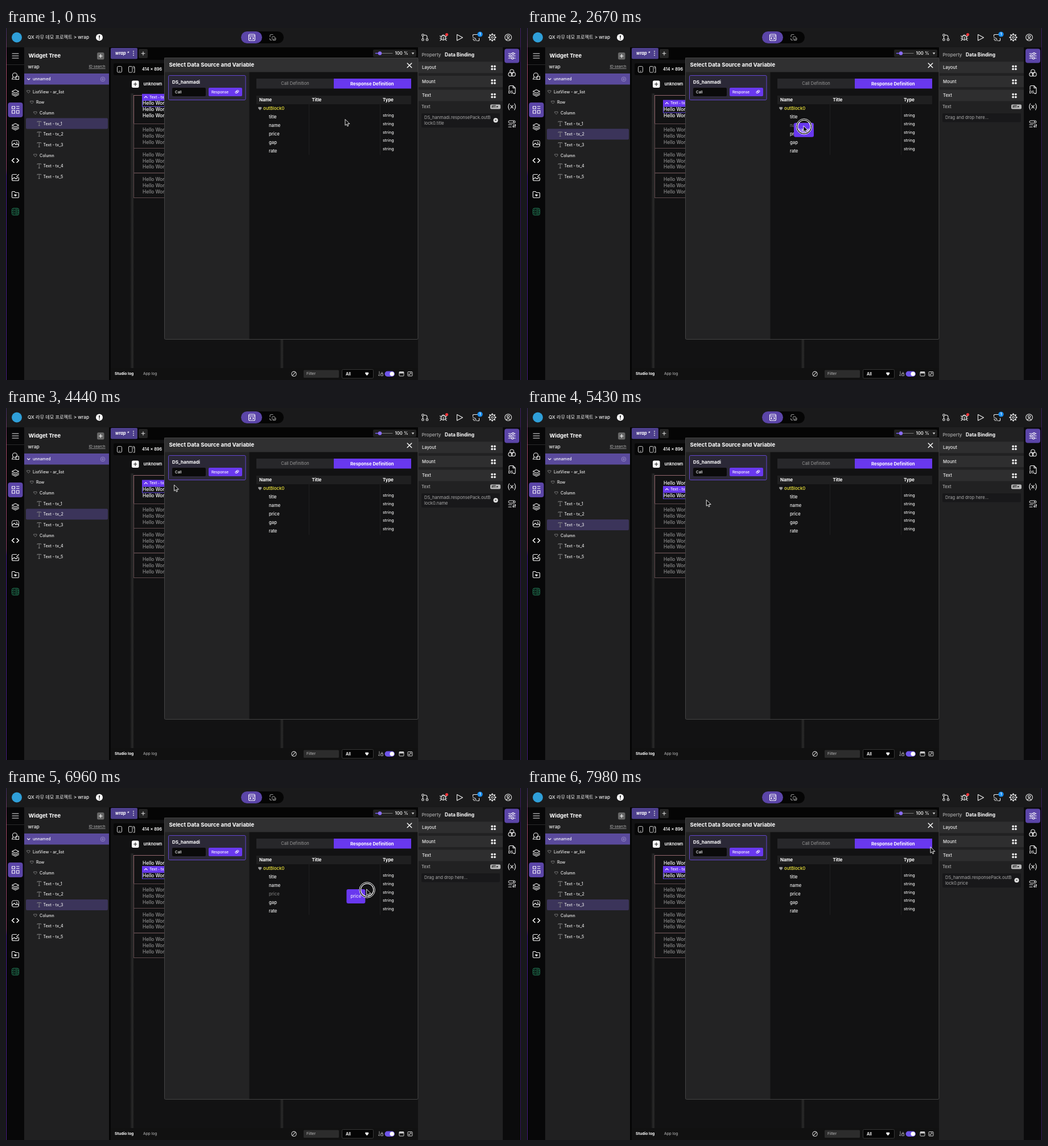
An HTML page that plays this animation: 905 px wide and 619 px high, repeating every 8 s.

```html
<!DOCTYPE html>
<html lang="ko">
<head>
<meta charset="utf-8">
<title>Data binding</title>
<style>
html, body { margin: 0; width: 100%; height: 100%; overflow: hidden; background: #000; }
svg { display: block; width: 905px; height: 619px; font-family: Inter, "Noto Sans CJK KR", "Noto Sans CJK", sans-serif; }
text { white-space: pre; }
</style>
</head>
<body>
<svg id="stage" viewBox="0 0 905 619" xmlns="http://www.w3.org/2000/svg"></svg>
<script>
const LOOP = 8000, VIOLET = '#6938ef', PINK = '#f52fd0';

const rect = (x, y, w, h, fill, more = '') =>
  `<rect x="${x}" y="${y}" width="${w}" height="${h}" fill="${fill}" ${more}/>`;
const box = (x, y, w, h, stroke, fill = 'none', rx = 0) =>
  rect(x, y, w, h, fill, `stroke="${stroke}" rx="${rx}"`);
// y is the middle of the line
const text = (x, y, s, size, fill = '#fff', weight = 500, more = '') =>
  `<text x="${x}" y="${(y + size * .36).toFixed(2)}" font-size="${size}" fill="${fill}" font-weight="${weight}" ${more}>${s}</text>`;
const path = (d, stroke = '#eee', width = 1.1, fill = 'none') =>
  `<path d="${d}" stroke="${stroke}" stroke-width="${width}" fill="${fill}" stroke-linecap="round" stroke-linejoin="round"/>`;
const dot = (x, y, r, fill, stroke = 'none', width = 1) =>
  `<circle cx="${x}" cy="${y}" r="${r}" fill="${fill}" stroke="${stroke}" stroke-width="${width}"/>`;
const ring = (x, y, r, stroke = '#eee', width = 1.1) => dot(x, y, r, 'none', stroke, width);
const at = (x, y, s) => `<g transform="translate(${x} ${y})">${s}</g>`;
const group = id => `<g id="${id}"></g>`;
const centre = 'text-anchor="middle"';

function topBar() {
  const gear = Array.from({ length: 8 }, (_, i) => {
    const a = i * Math.PI / 4, c = Math.cos(a), s = Math.sin(a);
    return `M${c * 5} ${s * 5}L${c * 6.2} ${s * 6.2}`;
  }).join('');
  return rect(0, 0, 905, 34, '#1a1a1b') +
    dot(19, 16.5, 9, '#2f9fd8') +
    text(38, 16.5, 'QX 라무 데모 프로젝트 &gt; wrap', 8.2, '#f2f2f2') +
    dot(164, 16.5, 6, '#fff') + rect(163.2, 13, 1.7, 4.5, '#222') + dot(164, 19.4, .9, '#222') +
    rect(413, 6, 75, 21, '#050505', 'rx="10.5"') + rect(413, 6, 37, 21, '#5b45a8', 'rx="10.5"') +
    at(432, 16.5, path('M-5.5 -3.5q0 -2 2 -2h7q2 0 2 2v7q0 2 -2 2h-7q-2 0 -2 -2zM-5.5 -2.5h11M-1.5 0l-2 1.5l2 1.5M1.5 0l2 1.5l-2 1.5', '#fff')) +
    at(469, 16.5, path('M-5 -1v-2q0 -2 2 -2h3M5 1v2q0 2 -2 2h-3M-5.5 2q0 3 3 3', '#999') + box(-1.5, -1.5, 5, 5, '#999', 'none', 1.5)) +
    at(736, 16.5, ring(-3.5, -4, 1.8) + ring(-3.5, 4, 1.8) + ring(4, 4, 1.8) + path('M-3.5 -2v4M-1.5 -4h2q3.5 0 3.5 3.5v2.5')) +
    at(768.5, 17, path('M-3.5 -2q3.5 -3 7 0v4q-3.5 5 -7 0zM0 -1v5M-2.5 -3.5q2.5 -3 5 0M-6 -3l2.5 1.5M6 -3l-2.5 1.5M-6 1h2.5M6 1h-2.5M-5.5 5l2 -2M5.5 5l-2 -2') + dot(6, -5.5, 2.6, '#f0353b')) +
    path('M792.5 11.5v10.5l10 -5.2z') +
    at(826, 17, path('M-5.5 -2v-2.5q0 -1 1 -1h7M5.5 1v3.5q0 1 -1 1h-2.5M-5.5 0q5.5 0 5.5 5.5M-5.5 3q2.5 0 2.5 2.5') + dot(7, -6, 4.6, '#1c8ff0') + text(7, -6, '1', 6.3, '#fff', 600, centre)) +
    at(854.5, 16.5, ring(0, 0, 4.9) + ring(0, 0, 1.8) + path(gear, '#eee', 2)) +
    at(882.5, 16.5, ring(0, 0, 5.8) + ring(0, -1.5, 2) + path('M-3.6 4.3q3.6 -4 7.2 0'));
}

function leftRail() {
  const layers = path('M0 -5.5l6 3l-6 3l-6 -3zM-6 .5l6 3l6 -3M-6 3l6 3l6 -3');
  const picture = box(-6, -5.5, 12, 11, '#eee', 'none', 2.5) + path('M-6 3l4 -4l3 3l2 -2l3 3') + dot(2.5, -2, 1, '#eee');
  const icons = [
    [49, path('M-5.5 -4h11M-5.5 0h11M-5.5 4h11')],
    [85, ring(-1, -2, 4) + path('M-4 1l-2 4h6M1 0h5v5.5h-5z')],
    [114, layers],
    [144, rect(-13, -13, 26, 26, '#5b45a8', 'rx="4"') + box(-6, -6, 5, 4, '#fff') + box(-6, 1, 5, 5, '#fff') + box(2, 1, 4.5, 5, '#fff') + path('M2 -6h4.5M2 -2.5h4.5', '#fff')],
    [173.5, layers],
    [203.5, picture],
    [233, path('M-2.5 -3.5l-3.5 3.5l3.5 3.5M2.5 -3.5l3.5 3.5l-3.5 3.5', '#fff', 1.6)],
    [263, path('M2 -5.5h-6q-2 0 -2 2v7q0 2 2 2h8q2 0 2 -2v-3M-6 3l4 -3l3 2.5l4 -3.5M2 -1.5l4 -4')],
    [293, path('M-6 -4.5q0 -1 1 -1h3.5l1.5 2h5q1 0 1 1v6.5q0 1.5 -1.5 1.5h-9q-1.5 0 -1.5 -1.5z') + path('M0 3l-2 -2q0 -2 2 -1q2 -1 2 1z', '#eee', .6, '#eee')],
    [323, box(-6, -6, 12, 12, '#23805a', 'none', 2.5) + path('M-6 -2h12M-6 2h12M-3.5 -4h1M-3.5 0h1M-3.5 4h1M0 -4h4M0 0h4M0 4h4', '#23805a', .9)]
  ];
  return rect(0, 34, 32, 585, '#070708') + icons.map(([y, s]) => at(16.5, y, s)).join('') +
    rect(0, 64, 32, 1, '#2b2b2b');
}

function tree() {
  const rows = [[37, 112, 'ListView - ar_list'], [43, 130.5, 'Row'], [49, 149.3, 'Column'], [58, 168, 'Text - tx_1', 1],
    [58, 186.6, 'Text - tx_2', 1], [58, 205.3, 'Text - tx_3', 1], [49, 224, 'Column'], [58, 242.5, 'Text - tx_4', 1], [58, 261, 'Text - tx_5', 1]];
  return rect(32, 34, 149, 585, '#202021') +
    text(39.5, 49, 'Widget Tree', 9.5, '#fff', 700) +
    rect(160, 43, 12.5, 12.5, '#666', 'rx="2.5"') + path('M163.5 49.2h5.6M166.3 46.4v5.6', '#fff') +
    text(38.5, 67.5, 'wrap', 8.5, '#eee') + text(145.5, 68, 'ID search', 6.5, '#bbb', 400, 'text-decoration="underline"') +
    rect(32, 80, 149, 19.5, '#5a4a9c') + path('M37.5 88.8l2.3 2.2l2.3 -2.2', '#fff') +
    text(47, 89.8, 'unnamed', 7.1) + ring(170, 90, 3.8, '#a094cf', .8) + ring(170, 90, 1.3, '#a094cf', .8) +
    group('mark') +
    rows.map(([x, y, s, leaf]) => leaf
      ? path(`M${x - 3} ${y - 2.5}v-1.2h6.6v1.2M${x + .3} ${y - 3.7}v7.4M${x - 1} ${y + 3.7}h2.6`, '#888', .9) + text(x + 7.5, y, s, 7, '#eee')
      : path(`M${x} ${y - 2}h5v2l-2.5 2.5l-2.5 -2.5z`, '#888', .8) + text(x + 10, y, s, 7, '#eee')).join('');
}

function canvas() {
  let s = rect(181, 34, 543, 585, '#050505') + rect(184, 56, 540, 542, '#121213') +
    rect(184, 35, 47, 19.5, '#4d3f8c', 'rx="2"') + text(192, 44.5, 'wrap *', 7.5, '#fff', 700, 'font-style="italic"') +
    [41, 44.5, 48].map(y => dot(224, y, .9, '#ddd')).join('') +
    rect(233, 37, 16, 16, '#242424', 'rx="2"') + path('M238 44.7h6M241 41.7v6', '#ddd') +
    rect(645, 38, 76, 13, '#202020', 'rx="2"') + path('M649.5 44.5h7', '#7a5cf5', 1.6) + path('M657 44.5h22', '#777', 1.2) + dot(657, 44.5, 3.2, '#8a6cf7') +
    text(683.5, 44.5, '100 %', 7.8) + path('M713.5 43.5h3.4l-1.7 2.4z', '#ddd', .5, '#ddd') +
    rect(189, 62, 92, 21, '#070707', 'rx="3"') +
    box(195.5, 67.5, 8, 10.5, '#ccc', 'none', 2) + path('M198.5 75.8h2', '#ccc', .8) +
    box(215.5, 67.5, 6.5, 10.5, '#ccc', 'none', 1.5) + path('M224 70h2v8h-2M223.5 67.5q2 0 2.5 1.5', '#ccc') +
    text(239, 72.5, '414 × 896', 7.3, '#fff', 600) +
    rect(221, 92.5, 12.5, 12.5, '#fff', 'rx="2.5"') + path('M224.5 98.8h5.5M227.2 96v5.5', '#222') +
    text(241.5, 98.5, 'unknown', 7.4, '#fff', 600) +
    rect(218, 115, 6.5, 483, 'url(#edge)') + rect(481, 115, 6.5, 483, 'url(#edge)');
  [[118.5, 50, 132.5], [168.5, 43, 179.5], [211.5, 43.5, 223], [255, 43.5, 266.3]].forEach(([y, h, line], i) => {
    s += box(224.5, y, 90, h, i ? '#5f4a4d' : '#94696f');
    for (let k = 0; k < 3; k++) s += text(240, line + k * 10.7, 'Hello World', 8.3, i ? '#8c8c8c' : '#fff');
  });
  return s + group('overlay');
}

function footer() {
  return rect(184, 598, 540, 21, '#111') +
    text(191, 608, 'Studio log', 6.8, '#fff', 700) + text(241, 608, 'App log', 6.6, '#aaa') +
    ring(506, 608.3, 4.2, '#ccc') + path('M503.2 611.2l5.6 -5.8', '#ccc') +
    rect(523, 601.5, 62, 13.5, '#2c2c2c', 'rx="1.5"') + text(528, 608, 'Filter', 6.7, '#aaa') +
    box(590.5, 600.5, 55, 15.5, '#383838', '#050505', 2) + text(597, 608, 'All', 7.2, '#fff', 600) +
    path('M631.8 606h5v2l-2.5 3l-2.5 -3z', '#fff', .6, '#fff') +
    path('M656 604v8l-1.7 -1.7M659 608h3.5v3.5h-3.5zM659.7 608v-2q1 -1.6 2 0v2', '#bbb', .8) +
    rect(665.5, 603.5, 17.5, 9.5, '#6f55e8', 'rx="4.7"') + dot(678.3, 608.2, 3.8, '#fff') +
    box(691, 604.5, 8, 7.5, '#ccc', 'none', 1) + rect(691, 604.5, 8, 3, '#ccc') +
    box(706, 604.5, 8, 7.5, '#ccc', 'none', 1) + path('M708 610l4 -3.6M709.8 606.4h2.2v2M708 608.2v1.8h2', '#ccc', .8);
}

function rightSide() {
  const section = (y, s) => rect(725, y - 10, 148, 20, '#2e2e2f') + text(731, y, s, 7.7, '#eee') +
    [[-2.4, -2.4], [2.4, -2.4], [-2.4, 2.4], [2.4, 2.4]].map(([dx, dy]) => dot(856.5 + dx, y + .5 + dy, 1.9, '#eee')).join('');
  const icons = [
    [49, rect(-13, -12.5, 26, 25, '#5b45a8', 'rx="4"') + path('M-6 -4h6M4 -4h2M-6 0h1M-1 0h7M-6 4h5M3 4h3', '#fff') + ring(2, -4, 1.7, '#fff') + ring(-3, 0, 1.7, '#fff') + ring(1, 4, 1.7, '#fff')],
    [79, ring(0, -2.6, 3.4) + ring(-2.8, 2.4, 3.4) + ring(2.8, 2.4, 3.4)],
    [108.5, path('M-5 0v-5q0 -2 2 -2h5l4 4v8q0 2 -2 2h-1M2 -7v4h4') + text(-6.5, 4, 'DS', 6.2, '#fff', 600) + dot(3, 6, .7, '#fff')],
    [138.5, path('M-4.5 -5.5q-3.5 5.5 0 11M4.5 -5.5q3.5 5.5 0 11M-2.3 -2.7l4.6 5.4M2.3 -2.7l-4.6 5.4')],
    [168.5, box(-6, -5.5, 12, 4.2, '#eee', 'none', 2) + path('M-6 1.5h6M-6 5.5h5M3 1v5l-1.5 -1.5M5.5 6v-5l1.2 1.5') + dot(3, -3.4, 1, '#eee')]
  ];
  return rect(724, 34, 149, 585, '#212122') +
    text(730.5, 46.7, 'Property', 8.2, '#aaa') + text(771, 46.7, 'Data Binding', 8.4, '#fff', 700) +
    section(69.3, 'Layout') + section(94, 'Mount') + section(118.5, 'Text') +
    text(730, 138.5, 'Text', 7.6, '#aaa') +
    rect(851, 134.5, 18, 8, '#bbb', 'rx="2"') + text(853, 138.4, 'att ▸', 5.8, '#222', 700) +
    group('field') +
    rect(873, 34, 32, 585, '#0b0b0c') + icons.map(([y, s]) => at(889, y, s)).join('');
}

function modal() {
  return rect(278, 52, 446, 495.5, '#121213', 'rx="2"') + rect(278, 77, 149.5, 470, '#232324') +
    rect(278, 52, 446, 25.5, '#303031') + box(278.5, 52.5, 445.5, 495, '#444', 'none', 2) +
    text(286.5, 64.7, 'Select Data Source and Variable', 9.6, '#fff', 700) +
    path('M705.2 62l7.6 7.6M712.8 62l-7.6 7.6', '#fff', 1.4) +
    box(285.5, 83.5, 135.5, 43, '#6347cf', '#2b2837', 2) + text(292, 95, 'DS_hanmadi', 8, '#fff', 700) +
    rect(292, 105, 59, 15, '#0a0a0a', 'rx="2"') + text(297, 112.5, 'Call', 6.4) +
    rect(356, 105, 59, 15, VIOLET, 'rx="2"') + text(361, 112.5, 'Response', 6.4) +
    box(403, 111.5, 3.6, 3, '#fff', 'none', 1) + box(405, 109.8, 3.8, 3, '#fff', 'none', 1) +
    rect(440, 89, 136, 17.5, '#27272a') + text(508, 97.7, 'Call Definition', 7.5, '#9a9a9a', 400, centre) +
    rect(576, 89, 136, 17.5, VIOLET) + text(643.3, 97.7, 'Response Definition', 7.8, '#fff', 700, centre) +
    rect(440, 119, 272, 15, '#1f1f20') +
    [[445, 'Name'], [537.5, 'Title'], [662, 'Type']].map(([x, s]) => text(x, 126.5, s, 7.8, '#fff', 700)).join('') +
    rect(532, 134, 1, 89, '#1f1f20') + rect(657, 134, 1, 89, '#1f1f20') +
    path('M443.8 139.3h5v2.3l-2.5 2.7l-2.5 -2.7z', '#999', .6, '#999') +
    text(452, 141.3, 'outBlock0', 7.7, '#f8ee3c') +
    ['title', 'name', 'price', 'gap', 'rate'].map((s, i) =>
      text(462, 156 + i * 15, s, 7.7, '#f2f2f2', 500, `id="row-${s}"`) + text(662, 153.2 + i * 14.9, 'string', 7.2, '#eee')).join('');
}

const stage = document.getElementById('stage');
stage.innerHTML = `<defs>
  <linearGradient id="edge"><stop stop-color="#121213"/><stop offset=".6" stop-color="#2a2a2a"/><stop offset="1" stop-color="#1c1c1c"/></linearGradient>
  <linearGradient id="rim" x2="0" y2="1"><stop stop-color="#3a2a60"/><stop offset=".12" stop-color="#a84c6c"/><stop offset=".4" stop-color="#90406c"/><stop offset=".42" stop-color="#4a1f96"/><stop offset="1" stop-color="#4a1f86"/></linearGradient>
  </defs>` + topBar() + leftRail() + tree() + canvas() + footer() + rightSide() + modal() +
  rect(0, 0, 1, 619, 'url(#rim)') + rect(904, 0, 1, 619, '#3c1c66') + group('chip') +
  `<g id="pointer"><g id="press">${ring(1, 1, 12.6, '#000', 2)}${ring(1, 1, 13.7, '#fff', 1)}${ring(1, 1, 11.2, '#fff', 1.2)}</g>` +
  path('M0 0v10.3l2.4 -2.2l1.6 3.7l1.8 -.8l-1.6 -3.5h3.3z', '#fff', .9, '#0a0a0a') + '</g>';
const el = id => document.getElementById(id);

// start, end, x, y and optional ease-out power
const MOVES = [
  [30, 780, 276, 150], [840, 1080, 259, 146], [1680, 2460, 474, 173], [2580, 3330, 767, 159],
  [3780, 4560, 264, 134], [4590, 4740, 259, 154], [5340, 6120, 470, 184, 2.5], [6150, 6420, 475, 186],
  [6660, 7225, 764, 172], [7225, 7410, 767, 160], [7500, 7990, 709, 104]
];
const PRESSES = [[1260, 1500], [2520, 3600], [4950, 5190], [6640, 7500]];
const DRAGS = [[2600, 3585, 'name', 35, 6], [6700, 7490, 'price', 33, 1.5]];
const FIELD = [[0, 'title'], [1470, ''], [3585, 'name'], [5150, ''], [7490, 'price']];
const LAG = 33;
const clamp = v => Math.max(0, Math.min(1, v));

function pointerAt(t) {
  let x = 596, y = 161;
  for (const [from, to, nx, ny, power] of MOVES) {
    if (t <= from) break;
    const p = clamp((t - from) / (to - from));
    const k = power ? 1 - (1 - p) ** power : p * p * (3 - 2 * p);
    x += (nx - x) * k;
    y += (ny - y) * k;
  }
  return { x, y };
}

const put = (id, s) => { const g = el(id); if (g.last !== s) g.innerHTML = g.last = s; };

function draw(t) {
  const { x, y } = pointerAt(t);
  const picked = t < 1470 ? 0 : t < 5150 ? 1 : 2;
  let over = x < 278 ? Math.floor((y - 127.3) / 10.7) : -1;
  if (over < 0 || over > 2 || over === picked) over = -1;

  let mark = rect(35, 158.5 + picked * 18.7, 144, 19, '#3b345a', 'rx="2"');
  let lay = box(239.5, 127.5 + picked * 10.7, 90, 10.7, '#6a4df0') +
    rect(239, 115.8 + picked * 10.7, 60, 11.4, VIOLET) +
    path(`M243.3 ${122.6 + picked * 10.7}l2.5 -2.4l2.5 2.4`, '#fff') +
    text(252, 121.3 + picked * 10.7, 'Text - tx_' + (picked + 1), 6.5);
  if (over >= 0) {
    mark += box(35.5, 159 + over * 18.7, 143, 18, PINK, 'none', 2);
    lay += box(239.5, 127.5 + over * 10.7, 90, 10.7, PINK) +
      rect(240, 116.8 + over * 10.7, 60, 10.7, PINK) +
      text(242.3, 122.3 + over * 10.7, 'Text - tx_' + (over + 1), 6.6);
  }
  put('mark', mark);
  put('overlay', lay);

  const drag = DRAGS.find(d => t >= d[0] && t < d[1]);
  for (const s of ['name', 'price']) el('row-' + s).setAttribute('fill', drag && drag[2] === s ? '#777' : '#f2f2f2');

  const bound = FIELD.filter(f => t >= f[0]).pop()[1];
  let field = rect(730, 150, 138, bound ? 25 : 15.5, '#18181a', 'rx="2"');
  if (bound) {
    field += text(735, 157, 'DS_hanmadi.responsePack.outB', 7.6, '#aaa', 400) + text(735, 167, 'lock0.' + bound, 7.6, '#aaa', 400) +
      dot(860.5, 162.3, 4, '#eee') + path('M859.2 161l2.6 2.6M861.8 161l-2.6 2.6', '#222', .9);
  } else {
    field += text(735, 157.3, 'Drag and drop here...', 7.6, '#aaa', 400);
    if (drag && x > 729 && y > 150 && y < 167) field += box(730, 152.5, 138, 9.8, '#2e8fc4');
  }
  put('field', field);

  let chip = '';
  if (drag) {
    const [from, , label, w, dy] = drag, lag = pointerAt(Math.max(from, t - LAG));
    chip = at((lag.x - 10).toFixed(2), (lag.y - dy).toFixed(2),
      rect(0, 0, w, 25, VIOLET, 'rx="3"') + text(w / 2, 12.5, label, 7.7, '#e8e0ff', 500, centre));
  }
  put('chip', chip);

  const press = Math.max(...PRESSES.map(([a, b]) => Math.min(clamp((t - a) / 60), clamp((b - t) / 60))));
  el('press').setAttribute('opacity', press);
  el('pointer').setAttribute('transform', `translate(${x.toFixed(2)} ${y.toFixed(2)})`);
}

const start = performance.now();
function tick() {
  draw((performance.now() - start) % LOOP);
  requestAnimationFrame(tick);
}
tick();
</script>
</body>
</html>
```
